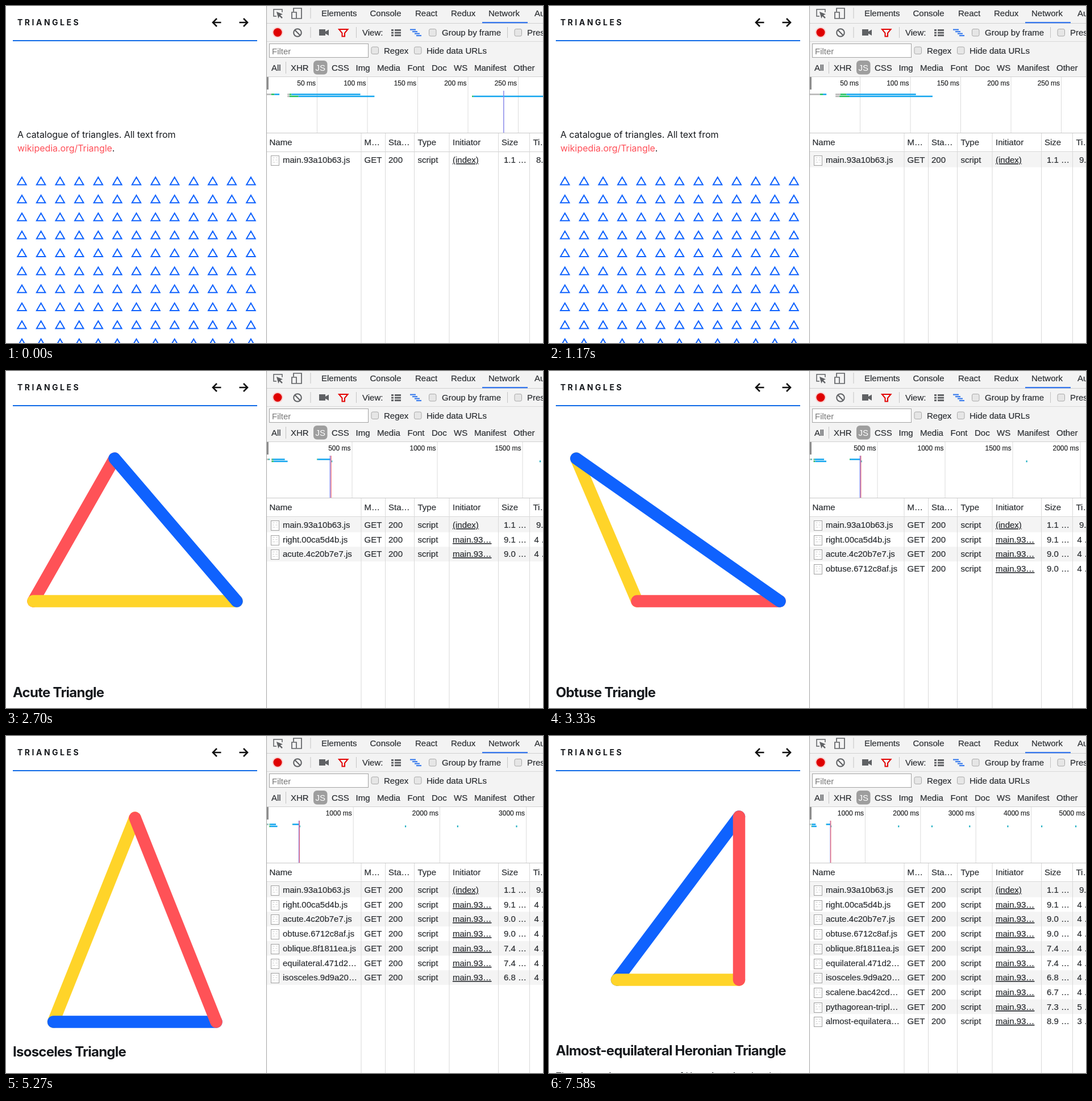
Write an HTML page that moves like this. It is 945 by 593 pixels and loops after 8 s.

```html
<!DOCTYPE html>
<html lang="en">
<head>
<meta charset="utf-8">
<title>Triangles</title>
<style>
  html, body { margin: 0; width: 100%; height: 100%; overflow: hidden; background: #fff; }
  svg { display: block; width: 945px; height: 593px; }
  text { white-space: pre; }
  .page { font: 16px Inter, "Open Sans", sans-serif; letter-spacing: -.05px; fill: #16191d; }
  .brand { font-size: 14px; font-weight: 700; letter-spacing: 3.5px; }
  .title { font-size: 24px; font-weight: 700; letter-spacing: -.75px; }
  .tools { font: 15px "Liberation Sans", Arial, sans-serif; fill: #2b2e32; }
  .tools text { stroke: #2b2e32; stroke-width: .2px; }
  .tools .pale { stroke: none; }
  .tick { font-size: 12px; text-anchor: end; fill: #222; }
  .link { text-decoration: underline; }
</style>
</head>
<body>
<svg viewBox="0 0 945 593">
  <g id="page" class="page"></g>
  <g id="chrome" class="tools"></g>
  <g id="network" class="tools"></g>
</svg>
<script>
const LOOP = 8000;
const LEFT = 459;
const COLOURS = { B: '#0f62fe', R: '#ff5257', Y: '#ffd429' };
const COLUMNS = [625, 667.5, 718.5, 780, 866.5, 921.5];

// Page views: start time, view name, side colours (left, base, right).
const VIEWS = [
  [0, 'home'], [630, 'blank'], [1170, 'home'],
  [2100, 'right', 'BRY'], [2700, 'acute', 'RYB'], [3330, 'obtuse', 'YRB'],
  [4070, 'oblique', 'BYR'], [4640, 'equilateral', 'RBY'], [5270, 'isosceles', 'YBR'],
  [5840, 'scalene', 'BRY'], [6380, 'heronian', 'YRB'],
  [6950, 'almost', 'YRB'], [7580, 'almost', 'BYR']
];

// Top, lower left and lower right corners, title centre, text.
const TRIANGLES = {
  right: { corners: [48, 118, 48, 369, 406, 369], y: 528, title: 'Right Triangle',
    text: ['A right triangle has one of its interior angles measuring',
           '90° (a right angle). The side opposite to the right angle is'] },
  acute: { corners: [191, 154, 48, 405, 406, 405], y: 565, title: 'Acute Triangle' },
  obtuse: { corners: [48, 154, 155, 405, 406, 405], y: 565, title: 'Obtuse Triangle' },
  oblique: { corners: [155, 150, 48, 430, 406, 430], y: 548, title: 'Oblique Triangle',
    text: ['Triangles that do not have an angle measuring 90°'] },
  equilateral: { corners: [227, 131, 73, 398, 381, 398], y: 541, title: 'Equilateral Triangle',
    text: ['An equilateral triangle has all sides the same length.'] },
  isosceles: { corners: [227, 144, 83.5, 503, 370, 503], y: 555, title: 'Isosceles Triangle' },
  scalene: { corners: [48, 168, 155, 490, 406, 490], y: 565, title: 'Scalene Triangle' },
  heronian: { corners: [284, 111, 48, 512.5, 284, 512.5], y: 543, title: 'Heronian Triangle',
    text: ['A right-angled triangle whose sidelengths are a'] },
  almost: { corners: [334.5, 142, 119.5, 429, 334.5, 429], y: 553, title: 'Almost-equilateral Heronian Triangle',
    text: ["There's a unique sequence of Heronian triangles that"] }
};

// Panel states: start time, row count, pixels per ms, tick step in ms, last loaded ms.
const PANELS = [
  [0, 1, 1.77, 50, 290], [480, 0, 1.77, 50, 0], [630, 0, 1.77, 50, 16],
  [720, 1, 1.77, 50, 60], [810, 1, 1.77, 50, 100], [900, 1, 1.77, 50, 130],
  [2010, 2, .371, 500], [2610, 3, .3, 500], [3330, 4, .238, 500],
  [3980, 5, .19, 500], [4640, 6, .168, 1000], [5270, 7, .1522, 1000],
  [5840, 8, .135, 1000], [6380, 9, .1215, 1000], [6950, 10, .0974, 1000]
];

// Requests: file, size, duration, moment on the overview.
const FILES = [
  ['main.93a10b63.js', '1.1', '9.', 0],
  ['right.00ca5d4b.js', '9.1', '4 ', 380],
  ['acute.4c20b7e7.js', '9.0', '4 ', 1603],
  ['obtuse.6712c8af.js', '9.0', '4 ', 2206],
  ['oblique.8f1811ea.js', '7.4', '4 ', 2887],
  ['equilateral.471d2…', '7.4', '4 ', 3576],
  ['isosceles.9d9a20…', '6.8', '4 ', 4189],
  ['scalene.bac42cd…', '6.7', '4 ', 4805],
  ['pythagorean-tripl…', '7.3', '5 ', 5345],
  ['almost-equilatera…', '8.9', '3 ', 5910]
];

// Overview bars: y, queued, sent, received, done.
const OLD_BARS = [
  [155.5, 0, 4.5, 7.5, 12.5], [155.5, 20.5, 22.5, 24.5, 93],
  [159, 20.5, 22.5, 31.5, 107], [159, 204, 204, 205.5, 285]
];
const BARS = [
  [155.5, 0, 10, 13, 16.5], [155.5, 25.5, 30.5, 36.5, 105.5],
  [159, 25.5, 29.5, 39.5, 122], [155.5, 294, 294, 298, 375]
];

const $ = id => document.getElementById(id);
const range = n => [...Array(n).keys()];
const rect = (x, y, w, h, fill, more = '') =>
  `<rect x="${x}" y="${y}" width="${w}" height="${h}" fill="${fill}" ${more}/>`;
const path = (d, stroke, width = 1, more = '') =>
  `<path d="${d}" fill="none" stroke="${stroke}" stroke-width="${width}" ${more}/>`;
const text = (x, y, value, more = '') => `<text x="${x}" y="${y}" ${more}>${value}</text>`;
const vline = (x, y1, y2, colour, width = 1) => path(`M${x} ${y1}V${y2}`, colour, width);
const current = (list, t) => list.findLast(item => item[0] <= t);

function header() {
  return text(20, 34, 'TRIANGLES', 'class="brand"')
    + path('M378.5 29H364.5M371 22L364 29L371 36M410.5 29H424.5M418 22L425 29L418 36', '#111', 2.6)
    + rect(12, 60, 430, 2, '#0f6ae6');
}

function home() {
  const marks = range(130).map(i => {
    const x = 28 + i % 13 * 33.58, y = 307.3 + Math.floor(i / 13) * 31.63;
    return `M${x} ${y - 6}l7.7 13.2h-15.4z`;
  }).join('');
  return text(20, 232, 'A catalogue of triangles. All text from')
    + text(20, 256, '<tspan fill="#ff4f58">wikipedia.org/Triangle</tspan>.')
    + path(marks, COLOURS.B, 2);
}

function triangle(name, sides) {
  const { corners: [ax, ay, bx, by, cx, cy], y, title, text: lines = [] } = TRIANGLES[name];
  const edges = [[ax, ay, bx, by], [bx, by, cx, cy], [ax, ay, cx, cy]];
  return edges.map(([x1, y1, x2, y2], i) =>
      path(`M${x1} ${y1}L${x2} ${y2}`, COLOURS[sides[i]], 21.5, 'stroke-linecap="round"')).join('')
    + text(12, y + 8.5, title, 'class="title"')
    + lines.map((line, i) => text(12, y + 51 + 24 * i, line)).join('');
}

function drawPage([, name, sides]) {
  if (name === 'blank') return '';
  return header() + (name === 'home' ? home() : triangle(name, sides));
}

function checkbox(x, y) {
  return rect(x + .5, y + .5, 12.5, 12.5, '#e6e6e6', 'rx="2.5" stroke="#a9a9a9"');
}

function icons() {
  const grey = '#5f6164', blue = '#3b7ded';
  return path('M476 18H471V6H486V11', grey, 1.5)
    + `<path d="M476 10l11 4.5-4.2 1.8 4 4-1.6 1.6-4-4-1.9 4.1z" fill="${grey}"/>`
    + path('M506 10V4H520V22H512M503 11H511V22H503Z', grey, 1.7)
    + '<circle cx="478" cy="46.5" r="9.5" fill="#f9cfcf"/><circle cx="478" cy="46.5" r="7.5" fill="#df0000"/>'
    + '<circle cx="513" cy="47" r="6.8" fill="none" stroke="#5f6164" stroke-width="2"/>'
    + path('M508.3 42.3L517.7 51.7', grey, 2)
    + `<path d="M551 41H562V45L568 41.5V52L562 48.5V52H551Z" fill="${grey}"/>`
    + path('M586 41H601.5L596 47.5V53.5H591.5V47.5Z', '#e30000', 2)
    + [41, 45.6, 50.2].map(y => rect(678, y, 4, 3, grey) + rect(684, y, 11, 3, grey)).join('')
    + rect(711, 40.5, 10, 2.2, blue) + rect(715, 44, 9, 2.2, blue)
    + rect(719, 47.5, 9, 2.2, blue) + rect(722, 51, 9, 2.2, blue);
}

function drawChrome() {
  const row = (y, items) => items.map(([x, label]) => text(x, y, label)).join('');
  return rect(LEFT, 0, 486, 124, '#f3f3f3')
    + rect(LEFT, 30, 486, 1, '#cfcfcf') + rect(LEFT, 62, 486, 1, '#d8d8d8')
    + rect(838, 28, 80, 2.3, '#3879ee')
    + row(18, [[555, 'Elements'], [640.5, 'Console'], [720, 'React'], [783, 'Redux'],
        [849, 'Network'], [930, 'Audits']])
    + icons()
    + vline(536, 3, 22, '#c4c4c4') + vline(536, 37, 56, '#c4c4c4')
    + vline(616.5, 37, 56, '#c4c4c4') + vline(882.5, 37, 56, '#c4c4c4') + vline(492.5, 98, 119, '#c4c4c4')
    + checkbox(744, 40) + checkbox(894.5, 40) + checkbox(642.5, 71.5) + checkbox(718, 71.5)
    + row(52, [[627, 'View:'], [767, 'Group by frame'], [917, 'Preserve log']])
    + rect(463.5, 66.5, 174, 24, '#fff', 'stroke="#a3a3a3"')
    + text(468, 84.5, 'Filter', 'class="pale" fill="#777"')
    + row(83.7, [[665, 'Regex'], [740, 'Hide data URLs']])
    + rect(541, 96, 24.5, 24.5, '#9e9e9e', 'rx="6"')
    + row(113.7, [[467, 'All'], [501, 'XHR'], [573, 'CSS'], [615.5, 'Img'], [653, 'Media'],
        [706.5, 'Font'], [749, 'Doc'], [788, 'WS'], [824, 'Manifest'], [893, 'Other']])
    + text(544.5, 113.7, 'JS', 'class="pale" fill="#fff"');
}

function overview([start, count, scale, step, until = 1e4]) {
  const x = ms => LEFT + ms * scale;
  const old = start === 0;
  const ticks = range(6).map(i => (i + 1) * step).map(ms =>
    vline(x(ms), 125, 223, '#dcdcdc') + text(x(ms) - 2.5, 140, `${ms} ms`, 'class="tick"')).join('');
  const bars = (old ? OLD_BARS : BARS).map(([y, ...stops]) =>
    ['#b5b5b5', '#1fbf5c', '#12a5ee'].map((colour, i) => {
      const from = stops[i], to = Math.min(stops[i + 1], until);
      return to > from ? rect(x(from), y - 1.25, (to - from) * scale, 2.5, colour) : '';
    }).join('')).join('');
  const dots = FILES.slice(1, count).map(file => rect(x(file[3]) - 1, 157.5, 2.2, 3, '#16acc0')).join('');
  const marks = old ? vline(x(235.5), 149, 223, '#8b8bea', 1.5)
    : count > 1 ? vline(x(371), 149, 223, '#7474ee', 1.2) + vline(x(377), 149, 223, '#ee7480', 1.4) : '';
  return ticks + bars + dots + marks + rect(LEFT, 125, 3, 22, '#8e8e8e');
}

function fileRow([name, size, time], i, old) {
  const y = 271 + 25.7 * i, base = Math.round(y + 5);
  const shade = i % 2 || old ? '' : rect(LEFT, y - 13, 486, 25.7, '#f4f4f4');
  return shade
    + rect(466.5, Math.round(y) - 7.5, 14, 17, '#fff', 'stroke="#a0a0a0"')
    + path(`M469 ${y - 4}h4m2 0h3M469 ${y}h3m2 0h4M469 ${y + 4}h5m2 0h2`, '#d2d2d2')
    + text(487, base, name) + text(630.5, base, 'GET') + text(673, base, '200') + text(724.5, base, 'script')
    + text(786, base, i ? 'main.93…' : '(index)', 'class="link"')
    + text(876, base, size + ' …')
    + text(i ? 929.5 : 933, base, (old ? '8.' : time) + '…');
}

function drawNetwork(panel) {
  const heads = ['Name', 'M…', 'Sta…', 'Type', 'Initiator', 'Size', 'Ti…'];
  const headX = [463.5, 630.5, 673, 724.5, 786, 872, 927.5];
  return rect(LEFT, 124, 486, 469, '#fff')
    + rect(LEFT, 124, 486, 1, '#d0d0d0')
    + overview(panel)
    + rect(LEFT, 223, 486, 1, '#c8c8c8') + rect(LEFT, 256, 486, 1, '#d0d0d0')
    + FILES.slice(0, panel[1]).map((file, i) => fileRow(file, i, panel[0] === 0)).join('')
    + COLUMNS.map(x => vline(x, 224, 593, '#d9d9d9')).join('')
    + heads.map((label, i) => text(headX[i], 245, label)).join('')
    + vline(458.5, 0, 593, '#a6a6a6');
}

let shownView, shownPanel;
function render(t) {
  const view = current(VIEWS, t), panel = current(PANELS, t);
  if (view !== shownView) $('page').innerHTML = drawPage(shownView = view);
  if (panel !== shownPanel) $('network').innerHTML = drawNetwork(shownPanel = panel);
}

$('chrome').innerHTML = drawChrome();
const began = performance.now();
function tick() {
  render((performance.now() - began) % LOOP);
  requestAnimationFrame(tick);
}
tick();
</script>
</body>
</html>
```
